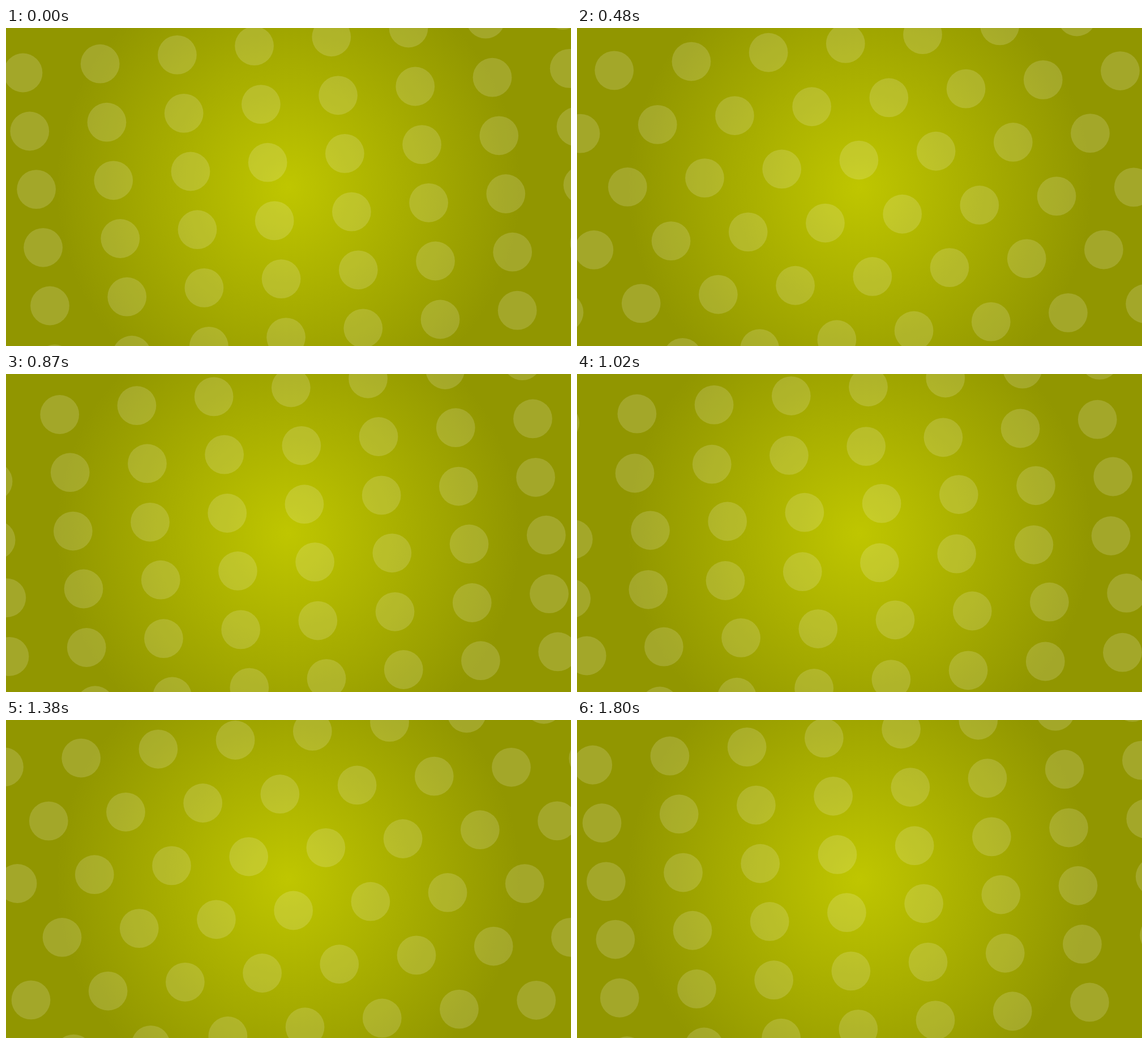
These frames come from a looping animation (998 by 561 pixels, 1.83 s). An HTML page with a canvas:

```html
<!DOCTYPE html>
<html lang="en">
<head>
<meta charset="utf-8">
<title>Sliding dots</title>
<style>
html, body { margin: 0; width: 100%; height: 100%; overflow: hidden; background: #919600; }
canvas { display: block; width: 998px; height: 561px; }
</style>
</head>
<body>
<canvas id="stage" width="998" height="561"></canvas>
<script>
const W = 998, H = 561;
const LOOP = 1830, TICK = 30;
const STEP = { x: 136.2, y: -15.8 };  // gap between neighbours in a row
const RADIUS = 34.4;
// First dot of each row; rows slide right and left in turn.
const rows = [[30, 79], [41.8, 182], [53.6, 284.6], [65.6, 387.3], [77.5, 490], [86, 593]];

const ctx = document.getElementById('stage').getContext('2d');
const glow = ctx.createRadialGradient(W / 2, H / 2, 0, W / 2, H / 2, 410);
glow.addColorStop(0, '#bfc600');
glow.addColorStop(1, '#919600');

function drawRow([x, y], shift) {
  for (let i = -2; i < 10; i++) {
    const n = i + shift;
    ctx.beginPath();
    ctx.arc(x + n * STEP.x, y + n * STEP.y, RADIUS, 0, Math.PI * 2);
    ctx.fill();
  }
}

function draw(time) {
  const t = Math.floor((time % LOOP) / TICK + 0.001) * TICK;
  const p = t / LOOP;
  ctx.fillStyle = glow;
  ctx.fillRect(0, 0, W, H);
  ctx.fillStyle = 'rgba(255, 255, 255, 0.16)';
  rows.forEach((row, i) => drawRow(row, i % 2 ? -p : p));
}

let start;
function frame(now) {
  if (start === undefined) start = now;
  draw(Math.max(0, now - start));
  requestAnimationFrame(frame);
}
draw(0);
requestAnimationFrame(frame);
</script>
</body>
</html>
```
